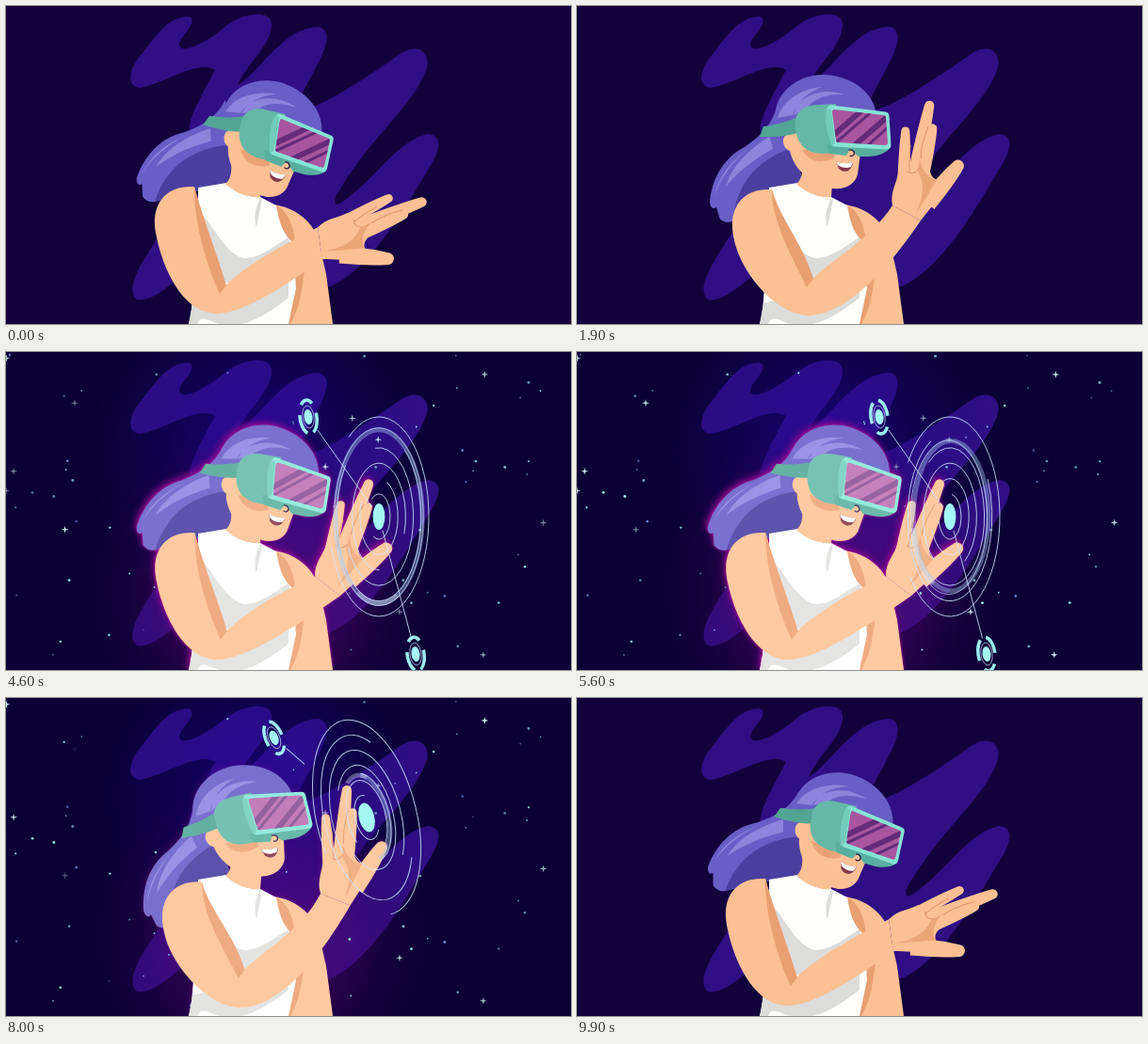
Animation of 600x338 px, one loop 10000 ms. Source, as an HTML page:

```html
<!DOCTYPE html>
<html lang="en">
<head>
<meta charset="utf-8">
<title>Virtual reality</title>
<style>
html, body { margin: 0; width: 100%; height: 100%; overflow: hidden; background: #12003b; }
svg { display: block; width: 100%; height: 100%; }
</style>
</head>
<body>
<svg viewBox="0 0 600 338" preserveAspectRatio="xMidYMid slice">
  <defs>
    <radialGradient id="warm" gradientUnits="userSpaceOnUse" cx="270" cy="255" r="185">
      <stop offset="0" stop-color="#650578" stop-opacity=".6"/>
      <stop offset=".55" stop-color="#52046e" stop-opacity=".4"/>
      <stop offset="1" stop-color="#1a0048" stop-opacity="0"/>
    </radialGradient>
    <radialGradient id="cool" gradientUnits="userSpaceOnUse" cx="265" cy="105" r="185">
      <stop offset="0" stop-color="#2406a8" stop-opacity=".6"/>
      <stop offset="1" stop-color="#14057a" stop-opacity="0"/>
    </radialGradient>
    <clipPath id="glassClip"><path d="M273 110Q271 110 271 113L275 142Q275 145 278 145L327 148Q330 148 330 145L328 119Q328 116 325 116Z"/></clipPath>
  </defs>
  <rect width="600" height="338" fill="#12003b"/>
  <rect id="night" width="600" height="338" fill="#0b0034"/>
  <path fill="#300e83" d="M196 12C203 20 183 33 184 42C187 52 215 38 235 20C255 6 282 4 282 20C282 42 255 62 246 84C268 72 295 22 332 22C358 30 318 78 306 112C330 112 380 78 420 50C440 38 452 52 446 68C432 108 385 140 350 203C346 220 362 205 375 194C400 172 420 142 448 136C466 138 460 155 448 174C420 222 385 280 345 298L200 285 190 283C172 300 152 315 139 312C126 300 142 275 168 236L205 200 250 180 240 112C225 125 208 138 197 138C188 130 205 100 222 68C205 56 165 84 142 87C124 84 134 62 145 50C160 30 176 8 196 12Z"/>
  <g id="glow">
    <rect width="600" height="338" fill="url(#cool)"/>
    <rect width="600" height="338" fill="url(#warm)"/>
  </g>
  <g id="stars"></g>

  <g id="figure">
    <g id="tail">
      <path fill="#695ec6" d="M212 106C207 126 196 138 178 150C153 163 143 187 141 209C142 216 146 217 148 214L152 227C157 231 162 231 166 229C180 221 205 204 240 196L232 140Z"/>
      <path fill="#4a3fa0" d="M225 152C203 160 186 174 177 190C170 203 166 217 166 229C180 221 205 204 240 196L234 160Z"/>
      <path fill="#8d84dd" d="M204 139C182 153 163 172 158 193C168 179 188 163 208 152ZM180 153C162 167 150 183 146 202C151 186 164 167 180 153Z"/>
    </g>
    <path fill="#fbc093" d="M284 211C306 214 326 228 332 250L340 285 347 338H288Z"/>
    <path fill="#e89f72" d="M287 212C300 218 306 236 307 252L296 250ZM308 276L322 264C312 290 318 310 302 338H292Z"/>
    <path fill="#fefefd" d="M204 193L234 188C246 200 258 203 270 203L287 212C289 228 294 242 304 251C310 265 306 285 308 300L300 338H194C200 318 196 300 204 280Z"/>
    <path fill="#dcdcdb" d="M207 220C222 236 232 262 252 268C273 268 288 252 300 246L307 272 262 300 226 292ZM270 204C264 216 263 226 266 235L272 206ZM300 290V310C285 322 268 334 250 338H226C214 334 207 328 203 338H194L198 316Z"/>
    <path fill="#fbc093" d="M238 155C241 176 239 184 233 189C245 200 258 204 270 203L271 190 285 165Z"/>
    <g id="head">
      <path fill="#fbc093" d="M222 125V137C217 140 218 151 226 154C229 168 240 182 256 189C275 199 294 194 298 179L302 148 260 118Z"/>
      <path fill="#eba276" d="M239 153C248 168 264 167 274 161L270 153Z"/>
      <path fill="#84384a" d="M275 165C281 168 288 167 293 166C292 175 285 179 278 173Z"/>
      <path fill="#fff" d="M275 165C281 168 288 167 293 166L291 171C286 173 281 172 277 169Z"/>
      <path fill="#695ec6" d="M318 115C315 91 290 73 260 73C231 74 212 94 211 113L213 137 236 132 240 116Z"/>
      <path fill="#8d84dd" d="M213 119C219 100 238 88 261 86C246 91 234 101 229 116ZM234 104C248 91 266 88 284 94C266 93 251 98 243 110L230 116Z"/>
      <path fill="#52a595" d="M194 139L198 128C214 126 226 122 239 116L243 132C226 139 210 139 194 139Z"/>
      <path fill="#65b7a7" d="M232 124C232 111 243 105 257 105L275 104 278 156 262 157C241 157 232 145 232 124Z"/>
      <path fill="#58ae9f" d="M264 147L333 150C329 156 320 160 309 160L299 160 290 152 286 159 268 157Z"/>
      <path fill="#86e3d4" stroke="#86e3d4" stroke-width="9" stroke-linejoin="round" d="M270 110 327 117 329 148 274 145Z"/>
      <path fill="#73cbbb" d="M265 108C262 122 266 138 271 149L274 145 270 110Z"/>
      <g clip-path="url(#glassClip)">
        <path fill="#a8559f" d="M265 104H335V155H265Z"/>
        <path stroke="#652b78" fill="none" stroke-width="6" d="M266 143L307 107M289 153L341 108"/>
        <path stroke="#652b78" fill="none" stroke-width="3" d="M274 146L318 108M302 154L346 115"/>
        <path id="sheen" fill="#f3c3e4" d="M265 104H335V155H265Z"/>
      </g>
      <path fill="none" stroke="#34204c" stroke-width="1.3" stroke-linecap="round" d="M289 153C294 152 296 157 293 159Q291 160 290 159"/>
    </g>
    <path id="arm" fill="#fbc093"/>
    <path id="armShade" fill="#e89f72"/>
    <g id="hand" fill="#fbc093">
      <path id="indexFinger"/>
      <path id="ringFinger"/>
      <path id="middleFinger"/>
      <path id="thumb"/>
      <path d="M-17-10C-20-24-12-34-11-45L22-52C23-42 26-38 32-37L40-25C28-14 21-4 13 6Z"/>
      <path fill="#eba678" d="M12-60C14-46 22-38 30-37C24-28 18-16 8-2C16-20 18-32 10-46Z"/>
      <path fill="none" stroke="#dc946a" stroke-linecap="round" d="M2-74Q0-58 1-45M21-94Q13-74 13-60M-1-46Q5-41 11-49"/>
    </g>
  </g>
  <g id="hud" fill="none"></g>
</svg>
<script>
const LOOP = 10000, STEP = 100, RAD = Math.PI / 180;
const $ = id => document.getElementById(id);
const set = (el, attrs) => { for (const k in attrs) el.setAttribute(k, attrs[k]); return el; };
const make = (parent, name, attrs = {}) =>
  parent.appendChild(set(document.createElementNS('http://www.w3.org/2000/svg', name), attrs));
const lerp = (a, b, k) => a + (b - a) * k;
const ramp = (t, from, to) => {
  const k = Math.max(0, Math.min(1, (t - from) / (to - from)));
  return k * k * (3 - 2 * k);
};
// Eases in over [a, b] and out over [c, d].
const pulse = (t, a, b, c, d) => ramp(t, a, b) * (1 - ramp(t, c, d));

// head/turn/tilt are angles; x, y place the wrist; hx, hy place the display.
const resting = { head: 16, lift: 0, open: 0, x: 333, y: 255, turn: 54, hx: 400, hy: 149, tilt: 0 };
const raised = { ...resting, head: 0, lift: 1, open: 1, x: 352, y: 222, turn: 0 };
const reaching = { ...raised, head: 1, x: 350, y: 226, turn: 8 };
const touching = { ...raised, head: 12.5, lift: .05, x: 343, y: 251, turn: 10, hx: 396, hy: 175 };
const looking = { ...raised, head: -10, lift: 1.15, y: 216, turn: -6, hx: 383, hy: 127, tilt: -14 };
const MOVES = [[100, 1500, raised], [1900, 3000, reaching], [3000, 4400, touching], [6700, 7900, looking], [8300, 9700, resting]];

function poseAt(t) {
  const pose = { ...resting };
  for (const [from, to, goal] of MOVES)
    for (const key in pose) pose[key] = lerp(pose[key], goal[key], ramp(t, from, to));
  return pose;
}

// A finger: narrows from its root to a round tip.
function finger(x, y, length, angle, width) {
  const c = Math.cos(angle * RAD), s = Math.sin(angle * RAD), tip = width * .34, root = width / 2;
  const at = (along, side) => `${(x + along * s + side * c).toFixed(1)} ${(y - along * c + side * s).toFixed(1)}`;
  return `M${at(0, -root)}Q${at(length * .6, -root)} ${at(length - tip, -tip)}A${tip} ${tip} 0 0 1 ${at(length - tip, tip)}Q${at(length * .6, root)} ${at(0, root)}Z`;
}

function drawFigure(t, pose) {
  const { head, lift, open, x, y, turn } = pose;
  set($('head'), { transform: `rotate(${head} 247 187)` });
  set($('tail'), { transform: `rotate(${poseAt(t + 400).head} 247 187)` });

  const c = Math.cos(turn * RAD), s = Math.sin(turn * RAD);
  const wrist = (px, py) => `${x + px * c - py * s} ${y + px * s + py * c}`;
  const shoulder = (px, py) => `${px + 7 * lift} ${py + 3 * lift}`;
  const elbow = (px, py) => `${px + 23 * lift} ${py + 2 * lift}`;
  const bend = (px, py) => `${px + 17 * lift} ${py - 7 * lift}`;
  const inner = `C${bend(222, 258)} ${shoulder(208, 222)} ${shoulder(200, 192)}`;
  set($('arm'), { d: `M${shoulder(200, 192)}C${shoulder(167, 190)} ${shoulder(152, 214)} ${shoulder(160, 246)}
    C${shoulder(167, 280)} ${elbow(188, 327)} ${elbow(224, 327)}C${elbow(250, 326)} ${elbow(290, 303)} ${wrist(13, 6)}
    L${wrist(-17, -10)}C${bend(295, 254)} ${bend(262, 270)} ${bend(232, 298)}${inner}Z` });
  set($('armShade'), { d: `M${bend(234, 297)}${inner}C${shoulder(199, 225)} ${bend(212, 275)} ${bend(227, 306)}Z` });

  set($('hand'), { transform: `translate(${x} ${y}) rotate(${turn})` });
  set($('indexFinger'), { d: finger(-5, -38, 56, lerp(8, 2, open), 13) });
  set($('middleFinger'), { d: finger(6, -40, 83, lerp(15, 12, open), 15) });
  set($('ringFinger'), { d: finger(15, -42, 56, 12, 14) });
  set($('thumb'), { d: finger(20, -12, 58, lerp(41, 39, open), 19) });
}

let seed = 11;
const random = () => (seed = seed * 16807 % 2147483647) / 2147483647;
const stars = Array.from({ length: 84 }, (_, i) => {
  const x = random() * 600, y = random() * 330, r = .8 + random() * .7;
  const el = i % 6
    ? make($('stars'), 'circle', { cx: x, cy: y, r, fill: i % 5 ? '#a5eef5' : '#7d8fe0' })
    : make($('stars'), 'path', { d: `M${x} ${y - 4}l.8 3.2 3.2.8-3.2.8-.8 3.2-.8-3.2-3.2-.8 3.2-.8Z`, fill: '#d7f4fa' });
  return { el, on: 2300 + i * 26, off: 7600 + random() * 1100, phase: random() * 7 };
});

function arc(r, start, sweep) {
  const at = a => `${(r * .5 * Math.cos(a * RAD)).toFixed(2)} ${(r * Math.sin(a * RAD)).toFixed(2)}`;
  const span = Math.min(sweep, 359.9);
  return `M${at(start)}A${r / 2} ${r} 0 ${span > 180 ? 1 : 0} 1 ${at(start + span)}`;
}

const hud = $('hud');
const stroke = (width, color = '#cfe3ff', opacity = .85, parent = hud) =>
  make(parent, 'path', { stroke: color, 'stroke-width': width, 'stroke-opacity': opacity });
const rings = Array.from({ length: 6 }, () => stroke(1));
const band = stroke(5, '#9fc4ea', .42), bright = stroke(5, '#dcefff', .35), bandEdge = stroke(.8);
const core = make(hud, 'ellipse', { fill: '#a4f7f4' });

function makeNode(x, y) {
  const link = stroke(1), g = make(hud, 'g');
  make(g, 'ellipse', { rx: 4.5, ry: 8, fill: '#a4f7f4' });
  const blades = [0, 1, 2].map(() => stroke(3.5, '#9cecf0', 1, g));
  set(stroke(.7, '#cfe3ff', 1, g), { d: arc(12, 0, 360) });
  return { x, y, link, g, blades };
}
const nodes = [makeNode(-75, -106), makeNode(39, 146)];

function drawNode({ x, y, link, g, blades }, t, shown, reach) {
  const at = k => `${x * k} ${y * k}`, rim = 1 - 17 / Math.hypot(x, y);
  set(g, { transform: `translate(${x} ${y}) rotate(-8) scale(${shown})`, opacity: shown });
  set(link, { d: `M${at(rim)}L${at(lerp(rim, .1, reach))}`, opacity: reach > 0 ? 1 : 0 });
  blades.forEach((el, i) => set(el, { d: arc(18, i * 120 + t * .05, 80) }));
}

function drawHud(t, { hx, hy, tilt, lift }) {
  const shown = pulse(t, 2300, 2900, 8100, 8700);
  const drawn = pulse(t, 2300, 3700, 7900, 8900);
  set(hud, { transform: `translate(${hx} ${hy}) rotate(${tilt}) scale(${lerp(.5, 1, shown)})`, opacity: shown });
  rings.forEach((el, i) => {
    const spin = (i % 2 ? -1 : 1) * (50 - 6 * i) * t / 1000;
    set(el, { d: arc(24 + 16.4 * i, 137 * i + spin, (250 + 20 * (i % 3)) * lerp(.4, 1, drawn)) });
  });
  const r = 108 - 16 * ramp(t, 3600, 4700) - 35 * ramp(t, 5000, 6500) - 11 * ramp(t, 6700, 8000);
  const sweep = 360 * pulse(t, 2300, 3700, 7200, 8700);
  const start = 185 + t * .012;
  set(band, { d: arc(r, start, sweep) });
  set(bandEdge, { d: arc(r + 2, start, sweep) });
  set(bright, { d: arc(r, start + t * .04, 55) });
  set(core, { rx: 6.3 + 1.7 * lift, ry: 14 + 1.5 * lift });
  drawNode(nodes[0], t, pulse(t, 2400, 2800, 8200, 8700), pulse(t, 2600, 3400, 7400, 8300));
  drawNode(nodes[1], t, pulse(t, 3300, 3900, 7300, 7800), pulse(t, 3500, 4200, 6900, 7500));
}

function render(t) {
  const pose = poseAt(t);
  const lit = pulse(t, 2200, 2900, 7800, 9000);
  const halo = pulse(t, 2200, 3000, 7100, 8300);
  set($('night'), { opacity: lit });
  set($('glow'), { opacity: lit });
  set($('sheen'), { opacity: lit * .25 });
  $('figure').style.filter = lit > .01
    ? `contrast(${1 - .18 * lit}) brightness(${1 + .12 * lit}) drop-shadow(0 0 1px rgba(190,10,150,${halo * .8})) drop-shadow(-2px -3px 3px rgba(150,8,145,${halo * .85}))`
    : 'none';
  for (const { el, on, off, phase } of stars)
    set(el, { opacity: pulse(t, on, on + 400, off, off + 400) * (.75 + .25 * Math.sin(t / 420 + phase)) });
  drawFigure(t, pose);
  drawHud(t, pose);
}

const begin = performance.now();
function frame() {
  const t = (performance.now() - begin) % LOOP;
  render(Math.floor(t / STEP) * STEP);
  requestAnimationFrame(frame);
}
frame();
</script>
</body>
</html>
```
